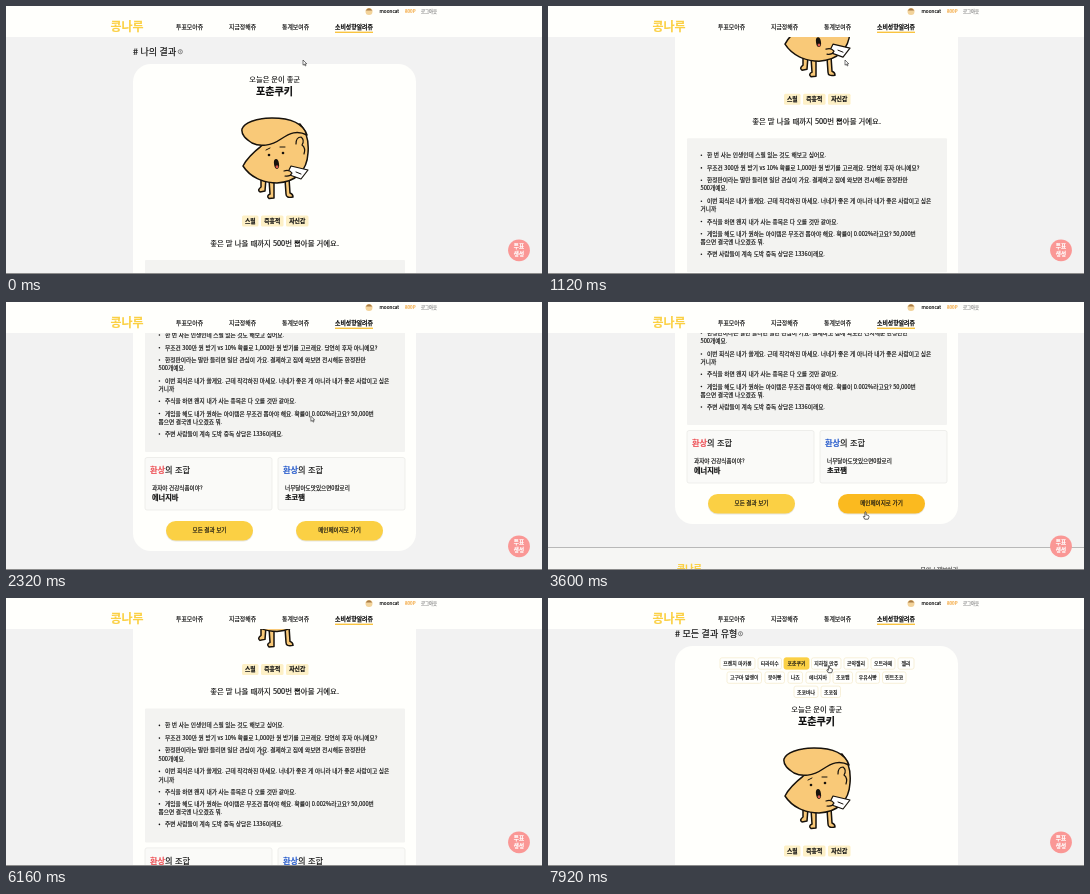
An HTML page for the animation above (8 s loop, 536 px wide and 268 px high).

```html
<!DOCTYPE html>
<html lang="ko">
<head>
<meta charset="utf-8">
<style>
  html, body { margin: 0; width: 100%; height: 100%; overflow: hidden; background: #f2f2f2; }
  svg { display: block; width: 536px; height: 268px; }
  text { font-family: "Noto Sans CJK KR", "Noto Sans CJK", "Noto Sans", sans-serif; white-space: pre; }
</style>
</head>
<body>
<svg id="stage" viewBox="0 0 536 268"></svg>
<script>
const LOOP = 8000, PAGE_SWITCH = 4720, TAB_SPACE = 48;
const INK = '#111', YELLOW = '#fbd044', HOVER = '#fbba1f', PAPER = '#fffffc';

// y is the optical middle of the line; the hairline stroke thickens small type
const text = (x, y, str, size, { fill = INK, weight = 500, anchor = 'start' } = {}) =>
  `<text x="${x}" y="${y + size * 0.36}" font-size="${size}" fill="${fill}" stroke="${fill}" stroke-width=".16" font-weight="${weight}" text-anchor="${anchor}">${str}</text>`;
const middle = (x, y, str, size, weight = 500, fill = INK) =>
  text(x, y, str, size, { weight, fill, anchor: 'middle' });
const box = (x, y, w, h, r, fill, extra = '') =>
  `<rect x="${x}" y="${y}" width="${w}" height="${h}" rx="${r}" fill="${fill}" ${extra}/>`;

const bullets = [
  [271, '한 번 사는 인생인데 스릴 있는 것도 해보고 싶어요.'],
  [283.7, '무조건 300만 원 받기 vs 10% 확률로 1,000만 원 받기를 고르래요. 당연히 후자 아니에요?'],
  [296, '한정판이라는 말만 들리면 일단 관심이 가요. 결제하고 집에 와보면 전시해둔 한정판만', '500개예요.'],
  [317, '이번 회식은 내가 쏠게요. 근데 착각하진 마세요. 너네가 좋은 게 아니라 내가 좋은 사람이고 싶은', '거니까'],
  [337.3, '주식을 하면 왠지 내가 사는 종목은 다 오를 것만 같아요.'],
  [349.5, '게임을 해도 내가 원하는 아이템은 무조건 뽑아야 해요. 확률이 0.002%라고요? 50,000번', '뽑으면 결국엔 나오겠죠 뭐.'],
  [370, '주변 사람들이 계속 도박 중독 상담은 1336이래요.'],
];
const bulletLine = ([y, line, rest]) =>
  `<circle cx="153.4" cy="${y}" r=".8" fill="${INK}"/>` + text(159, y, line, 5.7) +
  (rest ? text(152.5, y + 8.2, rest, 5.7) : '');

const cookie = `
  <g stroke="#17120c" stroke-width="1.5" stroke-linecap="round" stroke-linejoin="round" fill="#f9c978">
    <path d="M255 170 L255 181 Q251 184 254 186 L259 185 L260 172Z"/>
    <path d="M263 173 L264 188 Q260 190 263 192.500 L268 192 L268 174Z"/>
    <path d="M279 173 L280 188 Q280 192.500 287 191 Q287 188 284 187 L283 172Z"/>
    <path d="M258 138 C250 144 241 152 237 160 C244 171 257 177 271 177 C290 176 301 165 302 147 C303 136 301 126 294 118Z"/>
    <path d="M236 123 C238 117 250 112 266 112 C283 112 297 117 301 129 C291 124 284 127 275 133 C265 140 254 141 246 137 C240 133 235 129 236 123Z"/>
    <path d="M290 138 Q290 131 295 131 Q299 134 296 139 Q300 142 298 148" stroke-width="1.200"/>
    <path d="M281 168 L285 160 L302 164 L295 173 Z" fill="#fff" stroke-width="1.200"/>
    <path d="M278 165 Q283 163 286 167 Q284 171 279 170" stroke-width="1.200"/>
    <path d="M260 144 L264 142 M274 141 L279 141 M290 166 L295 168" fill="none" stroke-width="1"/>
  </g>
  <circle cx="263" cy="149" r="1.300" fill="#17120c"/><circle cx="277" cy="147" r="1.300" fill="#17120c"/>
  <ellipse cx="270.500" cy="158" rx="2.500" ry="5" fill="#17120c" transform="rotate(-8 270 158)"/>
  <ellipse cx="271" cy="160.800" rx="1.400" ry="1.500" fill="#d9594c"/>`;

const tags = [[236, 16.5, '스릴'], [255, 22.5, '즉흥적'], [280, 22.5, '자신감']]
  .map(([x, w, s]) => box(x, 209.5, w, 11, 1.5, '#fdf0c6') + middle(x + w / 2, 214.7, s, 5.8, 700)).join('');

const pairing = (x, color, lead, name) =>
  box(x, 393.5, 127, 52.5, 2, '#fafaf8', 'stroke="#e9e9e6" stroke-width=".7"') +
  text(x + 5, 406.3, `<tspan fill="${color}" stroke="${color}" font-weight="700">환상</tspan>의 조합`, 8.2) +
  text(x + 7, 423.6, lead, 5.6) + text(x + 7, 433, name, 7.2, { weight: 700 });

const button = (x, label, id) =>
  box(x, 458.5, 87, 19, 9.5, '#000', 'opacity=".1"') +
  box(x, 457, 87, 19.5, 9.7, YELLOW, id ? `id="${id}"` : '') +
  middle(x + 43.5, 466.4, label, 5.6);

const resultBody = ids =>
  middle(268.7, 73.3, '오늘은 운이 좋군', 7.25) + middle(268.6, 85.7, '포춘쿠키', 10.1, 700) +
  cookie + tags +
  middle(268.6, 237.3, '좋은 말 나올 때까지 500번 뽑아볼 거예요.', 7.4) +
  box(139, 254, 260, 134, 1, '#f3f3f1') + bullets.map(bulletLine).join('') +
  pairing(139, '#ee5a5f', '과자야 건강식품이야?', '에너지바') +
  pairing(272, '#3566cf', '너무달아도맛있으면0칼로리', '초코쨈') +
  button(160, '모든 결과 보기', ids[0]) + button(290, '메인페이지로 가기', ids[1]);

const title = (str, iconX) => text(127, 45.5, str, 9) +
  `<circle cx="${iconX}" cy="45.700" r="2.100" fill="none" stroke="#444" stroke-width=".6"/>
   <path d="M${iconX} 44.500v2.200" stroke="#444" stroke-width=".6"/>`;

const page = (id, heading, iconX, shift, tabs, ids) => `<g id="${id}">
  ${box(127, 58, 283, 429 + shift, 18, PAPER)}${title(heading, iconX)}${tabs}
  <g transform="translate(0 ${shift})">${resultBody(ids)}
    ${box(0, 510, 536, 90, 0, '#f6f6f4')}${box(0, 510, 536, .8, 0, '#a9a9a9')}
    ${text(129, 532, '콩나루', 9, { weight: 900, fill: YELLOW })}
    ${text(410, 532.5, '문의 / 제보하기', 5.8, { anchor: 'end', fill: '#444' })}</g></g>`;

const tabRows = [
  [75.5, [[172, 35, '프렌치 마카롱'], [210, 23.5, '티라미수'], [236, 25, '포춘쿠키'], [263.5, 29.5, '지하철 만쥬'],
    [296, 24, '곤약젤리'], [323, 24, '오트라떼'], [350, 16, '젤리']]],
  [89.6, [[179, 34.5, '고구마 말랭이'], [217, 19.5, '붕어빵'], [240, 14.5, '나쵸'], [258, 24, '에너지바'],
    [285, 19.5, '초코쨈'], [308, 23.5, '우유식빵'], [334.5, 23.5, '민트초코']]],
  [103.8, [[246, 24, '초코바나'], [273, 19.5, '초코칩']]],
];
const tabs = tabRows.map(([y, row]) => row.map(([x, w, s]) => {
  const active = s === '포춘쿠키';
  return box(x, y - 5.7, w, 11.4, 2, active ? YELLOW : '#fffffd',
    `stroke="${active ? YELLOW : '#f5ecd0'}" stroke-width=".8"`) + middle(x + w / 2, y, s, 4.9);
}).join('')).join('');

const header = box(0, 0, 536, 31, 0, PAPER) +
  text(104.5, 20.7, '콩나루', 12, { weight: 900, fill: YELLOW }) +
  text(170, 20.8, '투표모아쥬', 5.9) + text(223, 20.8, '지금정해쥬', 5.9) + text(276, 20.8, '통계보여쥬', 5.9) +
  text(329, 20.8, '소비성향알려쥬', 5.9, { weight: 700 }) + box(329, 25.6, 38, 1.4, 0, '#f9c440') +
  `<circle cx="363" cy="5.500" r="3.500" fill="#f3d39a"/><path d="M359.700 4.500Q363 0 366.300 4.500Z" fill="#a87b45"/>` +
  text(373.5, 5.6, 'mooncat', 4.7) + text(399, 5.6, '800P', 4.6, { fill: '#f3a53c' }) +
  text(415, 5.6, '로그아웃', 4.4, { fill: '#8a8a8a' });

const floating = `<circle cx="513" cy="244.300" r="10.900" fill="#fa9795"/>` +
  middle(513, 240, '투표', 5.6, 700, '#fff') + middle(513, 248, '생성', 5.6, 700, '#fff');

const cursor = `<g id="cursor" stroke-linejoin="round">
  <path id="arrow" d="M0 0V5.200L1.300 4.100L2.200 6L3 5.600L2.200 3.800H3.800Z" fill="#fff" stroke="#222" stroke-width=".6"/>
  <path id="hand" d="M-.6 .3Q0-.5.600.3V2.800L3 3.500Q3.800 4 3.300 5.500L2.700 7.200H-.8L-2.200 4.500L-1.500 4L-.6 4.800Z" fill="#fff" stroke="#222" stroke-width=".7"/></g>`;

document.getElementById('stage').innerHTML = box(0, 0, 536, 268, 0, '#f2f2f2') +
  page('result', '# 나의 결과', 174.3, 0, '', ['allButton', 'homeButton']) +
  page('types', '# 모든 결과 유형', 192.5, TAB_SPACE, tabs, []) +
  header + floating + box(0, 267, 536, 1, 0, '#8c8c8c') + cursor;

const $ = id => document.getElementById(id);

// Tables of [time, ...values], joined by straight runs
const resultScroll = [[80, 0], [720, 78], [880, 78], [1760, 238], [2400, 238], [2640, 265]];
const typesScroll = [[4840, 0], [5320, 313], [5520, 313], [7120, 10]];
const pointer = [[1920, 297, 54], [2960, 317.5, 210], [3640, 317.5, 210], [4080, 285, 166], [4480, 237, 200],
  [5520, 237, 200], [7120, 281.5, 78.5], [7840, 281, 67.5]];

function sample(table, t) {
  const next = table.findIndex(row => row[0] > t);
  if (next === 0) return table[0].slice(1);
  if (next < 0) return table[table.length - 1].slice(1);
  const a = table[next - 1], b = table[next];
  const p = (t - a[0]) / (b[0] - a[0]);
  return a.slice(1).map((v, i) => v + (b[i + 1] - v) * p);
}

const show = (id, on) => $(id).setAttribute('visibility', on ? 'visible' : 'hidden');
const inside = (x, y, left, top, w, h) => x >= left && x <= left + w && y >= top && y <= top + h;

function draw(t) {
  const onTypes = t >= PAGE_SWITCH;
  const [scroll] = sample(onTypes ? typesScroll : resultScroll, t);
  const [x, y] = sample(pointer, t);
  $('result').style.display = onTypes ? 'none' : '';
  $('types').style.display = onTypes ? '' : 'none';
  $(onTypes ? 'types' : 'result').setAttribute('transform', `translate(0 ${-scroll})`);

  const overAll = !onTypes && inside(x, y + scroll, 160, 457, 87, 20);
  const overHome = !onTypes && inside(x, y + scroll, 290, 457, 87, 20);
  $('allButton').setAttribute('fill', overAll ? HOVER : YELLOW);
  $('homeButton').setAttribute('fill', overHome ? HOVER : YELLOW);

  const overTabs = onTypes && inside(x, y + scroll, 172, 69, 194, 41);
  const pointing = overAll || overHome || overTabs;
  $('cursor').setAttribute('transform', `translate(${x} ${y})`);
  show('arrow', !pointing);
  show('hand', pointing);
}

const start = performance.now();
function tick() {
  draw((performance.now() - start) % LOOP);
  requestAnimationFrame(tick);
}
tick();
</script>
</body>
</html>
```
